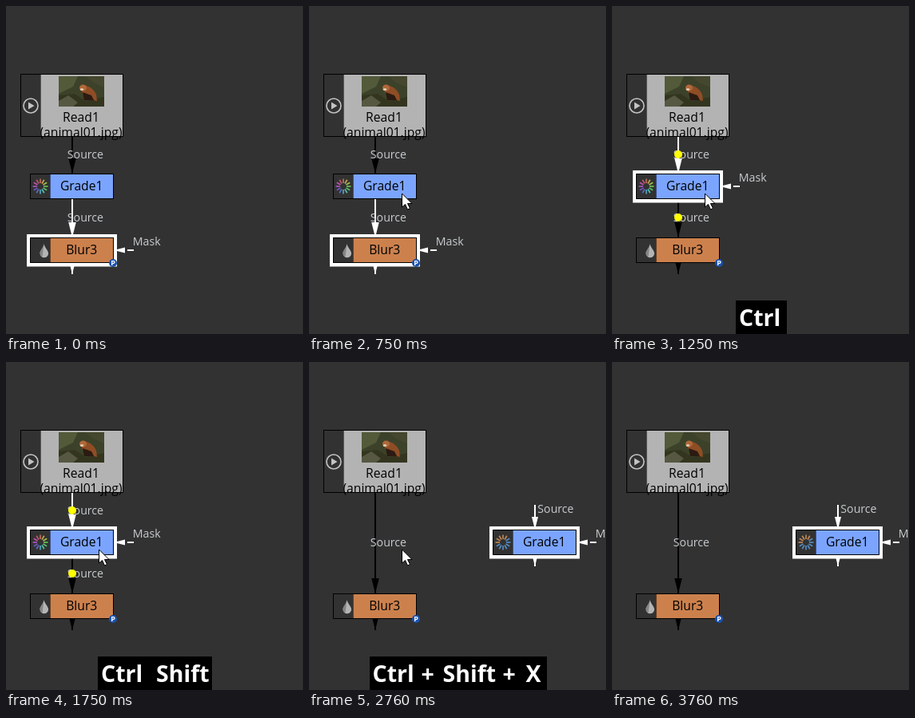
These frames come from a looping animation (372 by 411 pixels, 4.01 s). An HTML page:

```html
<!DOCTYPE html>
<html lang="en">
<head>
<meta charset="utf-8">
<title>Extracting a node</title>
<style>
  html, body { margin: 0; width: 100%; height: 100%; overflow: hidden; background: #323232; }
  svg { display: block; width: 372px; height: 411px; }
  text { font: 15.7px "Open Sans", "Noto Sans", sans-serif; }
  .title { text-anchor: middle; fill: #000; }
  .label { font-size: 14.2px; fill: #c8cccf; }
  .badge { font-size: 9px; font-weight: bold; text-anchor: middle; fill: #fff; }
  .keys { font-size: 28.5px; font-weight: bold; fill: #fff; }
</style>
</head>
<body>
<svg id="stage" viewBox="0 0 372 411"></svg>
<script>
const LOOP = 4010;
const stage = document.getElementById('stage');

const rect = (x, y, w, h, fill) => `<rect x="${x}" y="${y}" width="${w}" height="${h}" fill="${fill}"/>`;
const ellipse = (x, y, rx, ry, fill) => `<ellipse cx="${x}" cy="${y}" rx="${rx}" ry="${ry}" fill="${fill}"/>`;
const path = (d, fill, extra = '') => `<path d="${d}" fill="${fill}" ${extra}/>`;
const text = (s, x, y, cls) => `<text x="${x}" y="${y}" class="${cls}">${s}</text>`;
const dot = (x, y) => ellipse(x, y, 5, 5, '#ff0');

// Vertical connection from y1 to y2, with its head at y2
const arrow = (y1, y2, color, head = 19) =>
  rect(82, y1, 2, y2 - y1, color) +
  path(`M${83 - head / 4} ${y2 - head}h${head / 2}L83 ${y2}z`, color);

const maskInput = y =>
  path(`M135 ${y}l14-3.5v7z`, '#fff') + rect(152, y - 1, 8, 2, '#fff') +
  text('Mask', 158.7, y - 6, 'label');

function node(name, y, fill, icon, { selected, open }) {
  return (open ? arrow(y + 32, y + 46, selected ? '#fff' : '#000') : '') +
    (selected ? maskInput(y + 16) + rect(26, y - 4, 113, 40.5, '#fff') : '') +
    rect(30, y, 105, 32, '#000') + rect(31, y + 1, 24, 30, '#323232') +
    rect(55.5, y + 1, 78.5, 30, fill) + icon + text(name, 94.7, y + 21, 'title');
}

function wheel(moved) {
  let spokes = '';
  for (let i = 0; i < 12; i++) {
    const hue = moved ? (i < 2 || i > 8 ? 28 : 210) : (i * 30 + 15) % 360;
    spokes += `<path d="M43 222v-5.500" stroke="hsl(${hue} 45% 54%)" stroke-width="1.7" transform="rotate(${i * 30} 43 226)"/>`;
  }
  return spokes;
}

const drop = path('M47.500 298C47 303 42.500 306 42.500 310a5.300 5.300 0 0 0 10.600 0C53 306 48.500 303 47.500 298z', '#b4b4b4') +
  path('M47.500 298C47 303 42.500 306 42.500 310q.5 3 3 4.500z', '#858585');

const photo = rect(66, 88, 57, 38, '#3c4229') +
  path('M66 88h24l-6 13-18 9z', '#525a3a') + path('M100 88h23v14l-14-6z', '#45472e') +
  path('M66 112l20-2 14 9 23-5v12H66z', '#34351f') + path('M66 119l12-7 12 9-6 5H66z', '#565842') +
  path('M93 101q4-3 8-1 9 3 12 11l1 8-4-1-3-5-11-3z', '#8f4d25') +
  path('M96 108l11 4 3 6h-12z', '#2b1b12') +
  ellipse(96.5, 102.5, 4.5, 4, '#b0683a') + ellipse(95, 104.5, 2.2, 1.6, '#e0cdb0');

const reader = rect(18, 85, 129, 79, '#000') + rect(19, 86, 24, 77, '#323232') +
  rect(43.5, 86, 102.5, 77, '#b3b3b3') + photo +
  '<circle cx="31" cy="125" r="9" fill="none" stroke="#c4c4c4" stroke-width="1.6"/>' +
  path('M28 120.500v9l7.500-4.500z', '#c4c4c4') +
  text('Read1', 94, 145, 'title') + text('(animal01.jpg)', 94, 163.5, 'title');

const cross = (x, y) => path(`M${x - 12} ${y}h24M${x} ${y - 12}v24`, 'none', 'stroke="#eee" stroke-width="1.8"');
const pointer = path('M116.500 235v17l4-3.500 3 6.500 3-1.500-3-6h5.500z', '#fff', 'stroke="#000"');

const keyBar = (x, width, words) => rect(x, 369, width, 42, '#000') +
  words.map(([word, at]) => text(word, at, 401, 'keys')).join('');
const combo = x => [['Ctrl', x], ['+', x + 61], ['Shift', x + 88], ['+', x + 163], ['X', x + 192]];

const ctrl = keyBar(155, 64, [['Ctrl', 159]]);
const ctrlShift = keyBar(115, 143, [['Ctrl', 119], ['Shift', 188]]);
const ctrlCombo = keyBar(42, 289, [['Ctrl', 46], ...combo(114)]);
const fullCombo = keyBar(76, 222, combo(79.5));

const steps = [
  { at: 0 },
  { at: 250, cursor: cross(176, 324) },
  { at: 500, cursor: cross(124, 263) },
  { at: 750, cursor: pointer },
  { at: 1000, cursor: pointer, picked: true },
  { at: 1250, cursor: pointer, picked: true, dots: true, keys: ctrl },
  { at: 1750, cursor: pointer, picked: true, dots: true, keys: ctrlShift },
  { at: 2260, cursor: pointer, picked: true, moved: true, dots: true, keys: ctrlCombo },
  { at: 2760, cursor: pointer, picked: true, moved: true, keys: fullCombo },
  { at: 3010, cursor: cross(347.5, 398), picked: true, moved: true, keys: fullCombo },
  { at: 3760, picked: true, moved: true }
];

function scene({ cursor = '', picked = false, moved = false, dots = false, keys = '' }) {
  const source = (x, y) => text('Source', x, y, 'label');
  const input = moved
    ? arrow(179, 210, '#fff', 16) + source(86.3, 189)
    : arrow(164, 210, picked ? '#fff' : '#000') + source(76.8, 191);
  const grade = input + node('Grade1', 210, '#7ba4ff', wheel(moved), { selected: picked, open: moved });
  const dotMarks = moved ? dot(83, 226) + dot(199, 184) : dot(83, 186) + dot(83, 265);
  return arrow(moved ? 164 : 242, 290, picked ? '#000' : '#fff') +
    `<g transform="translate(${moved ? 200 : 0} 0)">${grade}</g>` +
    node('Blur3', 290, '#cc814d', drop, { selected: !picked, open: true }) +
    ellipse(134, 322, 5, 5, '#1a52ae') + text('P', 134.2, 325.3, 'badge') +
    source(76.8, moved ? 231 : 270) + reader +
    (dots ? dotMarks : '') + keys + cursor;
}

let shown;
function draw() {
  const time = performance.now() % LOOP;
  const step = steps.findLast(s => s.at <= time);
  if (step !== shown) {
    shown = step;
    stage.innerHTML = scene(step);
  }
  requestAnimationFrame(draw);
}
draw();
</script>
</body>
</html>
```
